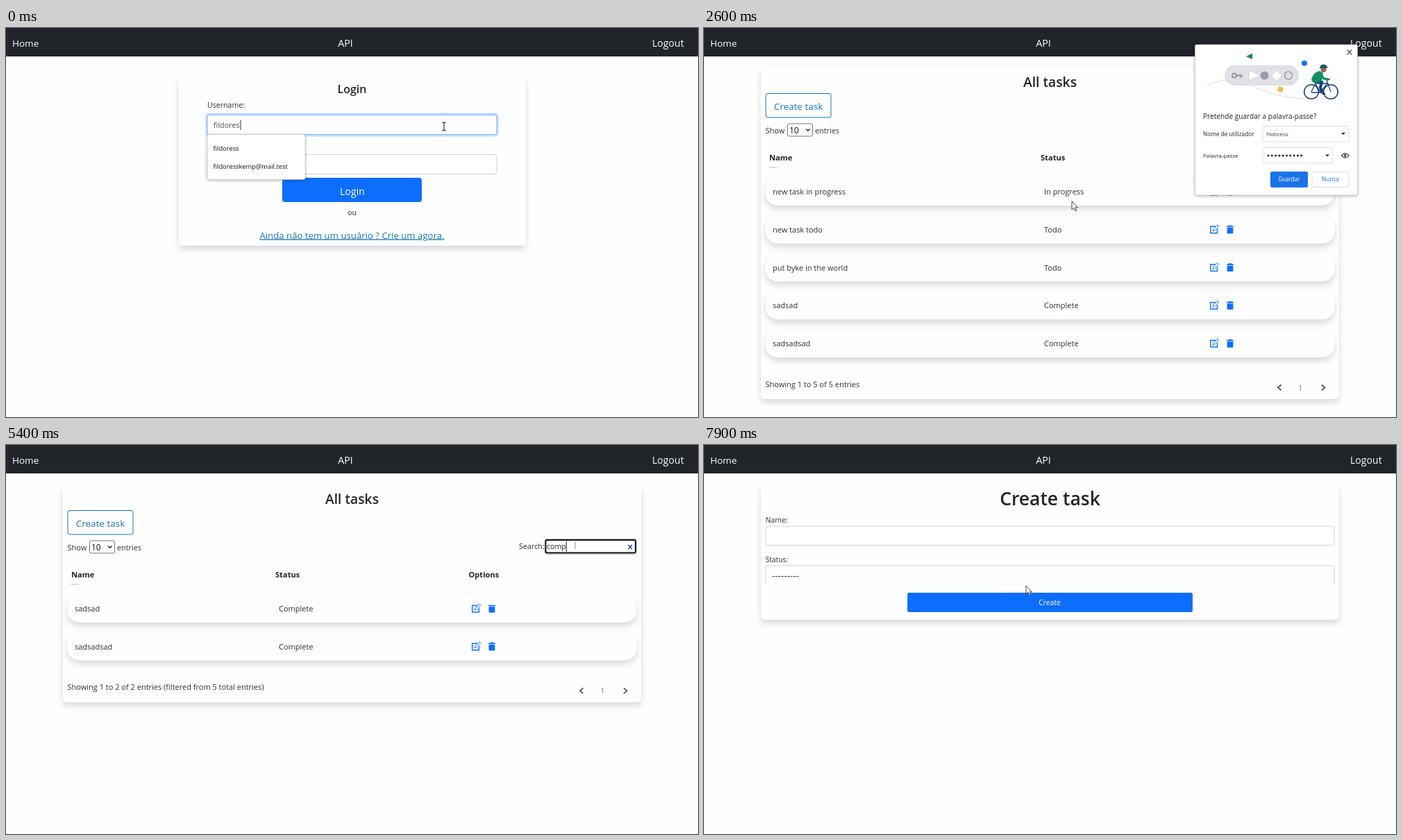
An HTML page for the animation above (8 s loop, 997 by 561 pixels).

```html
<!DOCTYPE html>
<html lang="pt">
<head>
<meta charset="utf-8">
<title>Task list demo</title>
<style>
html, body { margin: 0; width: 100%; height: 100%; overflow: hidden; background: #fefefe; }
svg { display: block; width: 997px; height: 561px; }
text { font-family: "Open Sans", "Noto Sans", sans-serif; white-space: pre; }
.card { fill: #fefefe; filter: drop-shadow(0 5px 5px rgba(0,0,0,.15)); }
.popup { fill: #fff; stroke: #c8c8c8; stroke-width: .7; filter: drop-shadow(0 1px 2px rgba(0,0,0,.3)); }
.field { fill: #fff; stroke: #ced4da; }
.ring { fill: none; stroke: #0d6efd; stroke-opacity: .25; stroke-width: 3; }
.focus { fill: #fff; stroke: #86b7fe; }
</style>
</head>
<body>
<svg id="stage" viewBox="0 0 997 561" xmlns="http://www.w3.org/2000/svg"></svg>
<script>
const INK = '#2b3035', BLUE = '#0d6efd', LINK = '#1b74bc', GREY = '#767676';
const USER = 'fildoress', MAIL = 'fildoresskemp@mail.test', QUERY = 'complete';
const LOOP = 8000, STEP = 100;

const text = (x, y, s, size = 11, fill = INK, extra = '') =>
  `<text x="${x}" y="${y}" font-size="${size}" fill="${fill}" ${extra}>${s}</text>`;
const mid = (x, y, s, size, fill, extra = '') => text(x, y, s, size, fill, 'text-anchor="middle" ' + extra);
const rect = (x, y, w, h, r, attrs) =>
  `<rect x="${x}" y="${y}" width="${w}" height="${h}" rx="${r}" ${attrs}/>`;
const path = (d, stroke = 'none', width = 1, fill = 'none') =>
  `<path d="${d}" stroke="${stroke}" stroke-width="${width}" fill="${fill}"/>`;
const circle = (x, y, r, fill, extra = '') =>
  `<circle cx="${x}" cy="${y}" r="${r}" fill="${fill}" ${extra}/>`;
const group = (id, body) => `<g id="${id}">${body}</g>`;
const dots = (x, y, n, gap, r) =>
  Array.from({ length: n }, (_, i) => circle(x + i * gap, y, r, '#222')).join('');
const SEMI = 'font-weight="600"', BOLD = 'font-weight="700"';

function navbar() {
  return rect(0, 0, 997, 41, 0, 'fill="#212529"') +
    text(9, 27, 'Home', 13.5, '#fff') + mid(489, 27, 'API', 14.3, '#fff') +
    text(931, 27, 'Logout', 14.1, '#fff');
}

function focusBox(id, y) {
  return group(id, rect(289, y - 1.5, 419, 31, 4, 'class="ring"') +
    rect(290, y, 417, 28, 3, 'class="focus"'));
}

function login() {
  return rect(249, 73, 499.5, 241, 0, 'class="card"') +
    mid(498.5, 93.5, 'Login', 16, '#212529', SEMI) +
    text(290, 115, 'Username:', 10.6) + text(290, 172, 'Password:', 10.6) +
    [125.5, 182.5].map(y => rect(290, y, 417, 28, 3, 'class="field"')).join('') +
    focusBox('userFocus', 125.5) + focusBox('passFocus', 182.5) +
    text(299, 143.5, '', 10.8, '#495057', 'id="userText"') +
    group('secret', '') +
    rect(398, 216, 201, 35, 4, 'id="loginBtn"') + mid(499, 240.5, 'Login', 14.2, '#fff') +
    mid(498.5, 270, 'ou', 10.8) +
    mid(498.5, 303.5, 'Ainda não tem um usuário ? Crie um agora.', 13.2, LINK, 'text-decoration="underline"') +
    path('M338 133V147', '#333', 1).replace('<path', '<path id="userCaret"') +
    group('suggest', rect(290, 153.5, 141, 65, 2, 'class="popup"') +
      text(298.5, 176.5, USER, 9.35, '#111') + text(298.5, 203, MAIL, 9.35, '#111'));
}

function icons(x, y, first) {
  return path(`M${x + 8} ${y - 4.5}H${x + .8}V${y + 5}H${x + 10.5}V${y - 1}`, BLUE, 1.4) +
    path(`M${x + 4} ${y + 2}l.5 -2.6 6.3 -6.3 2 2 -6.3 6.3Z`, BLUE, 1, '#fff') +
    (first ? '' : rect(x + 27, y - 6.3, 4, 2, .5, `fill="${BLUE}"`)) +
    rect(x + 24, y - 5.3, 10, 1.8, .3, `fill="${BLUE}"`) +
    rect(x + 24.6, y - 2.8, 8.8, 8.6, 1, `fill="${BLUE}"`);
}

function pager(y) {
  return path(`M831.5 ${y - 4}l-4.5 4 4.5 4M890 ${y - 4}l4.5 4 -4.5 4`, '#555', 1.8) +
    mid(859.5, y + 4, '1', 10.5, '#777');
}

function table(rows, statusX, optionX, info) {
  const end = 261.5 + rows.length * 54.7;
  return rect(82, 57, 833, end - 57, 6, 'class="card"') +
    text(94, 190.5, 'Name', 11.2, '#212529', BOLD) +
    text(statusX, 190.5, 'Status', 11.1, '#212529', BOLD) +
    text(optionX, 190.5, 'Options', 11.1, '#212529', BOLD) +
    path('M93.500 201H104.500', '#bbb') +
    rows.map(([name, status], i) => {
      const y = 236 + i * 54.75;
      return rect(88.5, y - 20, 820, 40, 18, 'class="card"') +
        text(99, y + 4, name) + text(statusX + 5, y + 4, status) +
        icons(optionX + 4.5, y, i === 0);
    }).join('') +
    text(88.5, end - 17.5, info) + pager(end - 16.5);
}

function tasks() {
  const rows = [['new task in progress', 'In progress'], ['new task todo', 'Todo'],
    ['put byke in the world', 'Todo'], ['sadsad', 'Complete'], ['sadsadsad', 'Complete']];
  return group('all', table(rows, 485, 724.5, 'Showing 1 to 5 of 5 entries')) +
    group('filtered', table(rows.slice(3), 388, 666.5,
      'Showing 1 to 2 of 2 entries (filtered from 5 total entries)')) +
    mid(498.5, 84.5, 'All tasks', 19.3, '#212529', SEMI) +
    rect(89, 94.5, 94, 34.5, 3, `id="newBtn" stroke="${LINK}"`) +
    mid(136, 118, 'Create task', 13.5, LINK, 'id="newText"') +
    text(88.5, 151.5, 'Show') + text(160, 151.5, 'entries', 10.8) +
    rect(120.5, 138, 36, 18, 2, `fill="#fff" stroke="${GREY}"`) +
    text(123, 151.5, '10', 12, '#111') + path('M147 145.500l2.800 2.800 2.800 -2.800', '#222', 1.4) +
    text(739, 150, 'Search:', 10.8) +
    group('searchIdle', path('M776.500 136V157H908V136', GREY, 1, '#fefefe')) +
    group('searchOn', rect(776.5, 135.5, 132, 22, 2, 'fill="#fff" stroke="#aaa" stroke-width=".7"') +
      rect(777.5, 137, 129.5, 18.5, 2, 'fill="#fff" stroke="#101010" stroke-width="2"')) +
    text(779, 150, '', 10.6, '#222', 'id="query"') +
    group('clear', path('M896.500 144l5.500 6m0 -6l-5.500 6', '#1d5aa5', 1.8)) +
    path('M0 139V154', '#222').replace('<path', '<path id="queryCaret"');
}

function create() {
  return rect(82, 57, 833, 195, 6, 'class="card"') +
    mid(498.5, 87, 'Create task', 26.5, '#212529', SEMI) +
    text(88.5, 112, 'Name:', 10.5) + text(88.5, 169, 'Status:', 10.3) +
    rect(89, 117, 819, 27.5, 3, 'class="field"') +
    path('M89 201V176.500Q89 174 91.500 174H905.500Q908 174 908 176.500V201', '#ced4da') +
    path('M433 201H456', '#eceef0') +
    text(98, 192.5, '---------', 13.4) +
    rect(293, 213, 411, 28, 2.5, `fill="${BLUE}"`) + mid(498, 231, 'Create', 10.4, '#fff');
}

function cyclist() {
  const navy = '#183f77';
  const wheel = x => circle(x, 92, 10.3, 'none', `stroke="${navy}" stroke-width="1.5"`);
  return wheel(875) + wheel(903) +
    path('M875 92L881 80H898L888 93H875M881 80L888 93M903 92L897 75L902 74', navy, 1.3) +
    path('M879 77L890 78L888 86L891 94', navy, 4) +
    path('M891 95H895', '#222', 2) +
    path('M875 75Q877 64 887 62L892 65L890 77L878 79Z', 'none', 1, '#148f63') +
    path('M889 67L893 73L900 74', '#148f63', 3) +
    circle(892.5, 60, 4, '#9a6350') +
    path('M887 58Q888 52 893 52.500Q898 53 898.500 58Z', 'none', 1, '#24566b');
}

function prompt() {
  const caret = (x, y) => path(`M${x - 3} ${y - 1.5}h6l-3 3Z`, 'none', 1, '#222');
  return rect(707.5, 24, 234, 217, 2, 'class="popup"') +
    path('M926.500 31.500l7 7m0 -7l-7 7', '#555', 1.3) +
    path('M725 83C745 72 768 73 787 82S830 101 868 102', '#dadce0') +
    path('M781 41L790 36.500V45Z', 'none', 1, '#188058') +
    rect(750, 53.5, 107, 29.5, 14.7, 'fill="#dfe1e5"') +
    circle(764, 68.5, 3, 'none', 'stroke="#999da2" stroke-width="2.200"') +
    path('M767 68.500H776M773 68.500V72', '#999da2', 2.4) +
    path('M786 62L799 68.500L786 75Z', 'none', 1, '#fff') +
    circle(807.5, 68.5, 6, '#999da2') +
    path('M825 61.500l7 7 -7 7 -7 -7Z', 'none', 1, '#fff') +
    circle(842, 68.5, 5.5, 'none', 'stroke="#999da2" stroke-width="1.500"') +
    path('M865 46.500l4 2v4.500l-4 2 -4 -2v-4.500Z', 'none', 1, '#1a73e8') +
    path('M828 84l7 2 -2 7 -7 -2Z', 'none', 1, '#edbb48') +
    cyclist() +
    text(719, 131, 'Pretende guardar a palavra-passe?', 10.15, '#222') +
    text(719, 155.5, 'Nome de utilizador', 8.25, '#222') +
    text(719, 187, 'Palavra-passe', 7.9, '#222') +
    rect(805, 141.5, 124, 22.5, 2, 'fill="#fff" stroke="#dadce0"') +
    rect(805, 172.5, 101, 22.5, 2, 'fill="#fff" stroke="#dadce0"') +
    text(810.5, 155.5, USER, 7.9, '#333') + dots(813, 184, 10, 5.3, 1.5) +
    caret(921, 152.5) + caret(898, 184) +
    path('M918.500 184Q923.700 177.500 929 184Q923.700 190.500 918.500 184Z', '#555', 1.3) +
    circle(923.7, 184, 1.9, '#555') +
    rect(816, 207, 54, 23, 2.5, 'fill="#1a73e8"') + mid(843, 221, 'Guardar', 8.1, '#fff') +
    rect(876, 207.5, 53, 22, 2.5, 'fill="#fff" stroke="#dadce0"') + mid(902.5, 221, 'Nunca', 8.3, '#1a73e8');
}

function pointers() {
  return group('beam', path('M-3 -6Q0 -6 0 -4.500Q0 -6 3 -6M0 -5V5M-3 6Q0 6 0 4.500Q0 6 3 6', '#222', 1.1)) +
    group('bar', path('M0 -5.500V5.500', '#888')) +
    group('arrow', path('M0 0V12L2.900 9.400L4.800 13.800L6.700 13L4.800 8.800H8.500Z', '#333', .9, '#fff')) +
    group('hand', path('M-1 1Q0 -.8 1.200 1V6Q2.500 4.800 3.500 6.200Q5 5.200 6 6.800Q8 6.200 8.300 8.500V12L6.800 16.500H.8L-3 11Q-3.300 8.500 -1 9.800Z', '#333', 1, '#fff'));
}

const stage = document.getElementById('stage');
stage.innerHTML = group('login', login()) + group('tasks', tasks()) + group('create', create()) +
  navbar() + group('prompt', prompt()) + group('pointer', pointers());
const el = {};
stage.querySelectorAll('[id]').forEach(n => el[n.id] = n);

// Pointer stops: time, x, y, shape
const stops = [
  [0, 631, 142, 'beam'], [1700, 631, 142, 'beam'], [1900, 530, 250, 'hand'],
  [2400, 530, 250, 'arrow'], [2800, 530, 250, 'arrow'], [3300, 916, 66, 'arrow'],
  [3500, 929, 36, 'arrow'], [3700, 929, 36, 'arrow'], [4300, 803, 217, 'arrow'],
  [4600, 803, 217, 'arrow'], [4800, 820, 145, 'bar'], [6700, 820, 145, 'arrow'],
  [7200, 140, 118, 'hand'], [7500, 140, 118, 'arrow'], [7900, 464, 203, 'arrow'],
  [LOOP, 464, 203, 'arrow']
];

const show = (id, on) => el[id].style.display = on ? '' : 'none';
const clamp = (v, lo, hi) => Math.max(lo, Math.min(hi, v));

function movePointer(t) {
  const i = stops.findIndex((s, k) => t >= s[0] && t < stops[k + 1][0]);
  const [t0, x0, y0, shape] = stops[i], [t1, x1, y1] = stops[i + 1];
  const p = (t - t0) / (t1 - t0), e = p * p * (3 - 2 * p);
  el.pointer.setAttribute('transform', `translate(${x0 + (x1 - x0) * e} ${y0 + (y1 - y0) * e})`);
  ['beam', 'bar', 'arrow', 'hand'].forEach(s => show(s, s === shape));
}

function drawLogin(t) {
  const onPass = t >= 300;
  el.userText.textContent = t < 100 ? USER.slice(0, -1) : USER;
  el.userCaret.setAttribute('transform', `translate(${t < 100 ? 0 : 5} 0)`);
  ['userFocus', 'userCaret', 'suggest'].forEach(id => show(id, !onPass));
  show('passFocus', onPass);
  const n = clamp((t - 600) / STEP, 0, 10);
  el.secret.innerHTML = dots(301.5, 196.5, n, 5.3, 1.4) +
    (onPass ? path(`M${299.5 + n * 5.2} 189V203`, '#333') : '');
  el.loginBtn.setAttribute('fill', t >= 1900 ? '#0b5ed7' : BLUE);
}

function drawTasks(t) {
  const typed = clamp((t - 5000) / STEP, 0, QUERY.length);
  const erased = clamp(Math.floor((t - 5900) / 75), 0, QUERY.length);
  const n = typed - erased, focused = t >= 4800, hover = t >= 7200;
  el.query.textContent = QUERY.slice(0, n);
  show('filtered', n > 0);
  show('all', n === 0);
  show('clear', n > 0);
  show('queryCaret', n > 0);
  if (n > 0) {
    const x = 779.5 + el.query.getComputedTextLength();
    el.queryCaret.setAttribute('transform', `translate(${x} 0)`);
  }
  show('searchOn', focused);
  show('searchIdle', !focused);
  el.newBtn.setAttribute('fill', hover ? BLUE : '#fefefe');
  el.newText.setAttribute('fill', hover ? '#fff' : LINK);
}

function render(time) {
  const t = Math.floor((time % LOOP) / STEP) * STEP;
  const page = t < 2400 ? 'login' : t < 7500 ? 'tasks' : 'create';
  ['login', 'tasks', 'create'].forEach(id => show(id, id === page));
  show('prompt', t >= 2600 && t < 3700);
  if (page === 'login') drawLogin(t);
  if (page === 'tasks') drawTasks(t);
  movePointer(t);
}

const start = performance.now();
function tick() {
  render(performance.now() - start);
  requestAnimationFrame(tick);
}
tick();
</script>
</body>
</html>
```
